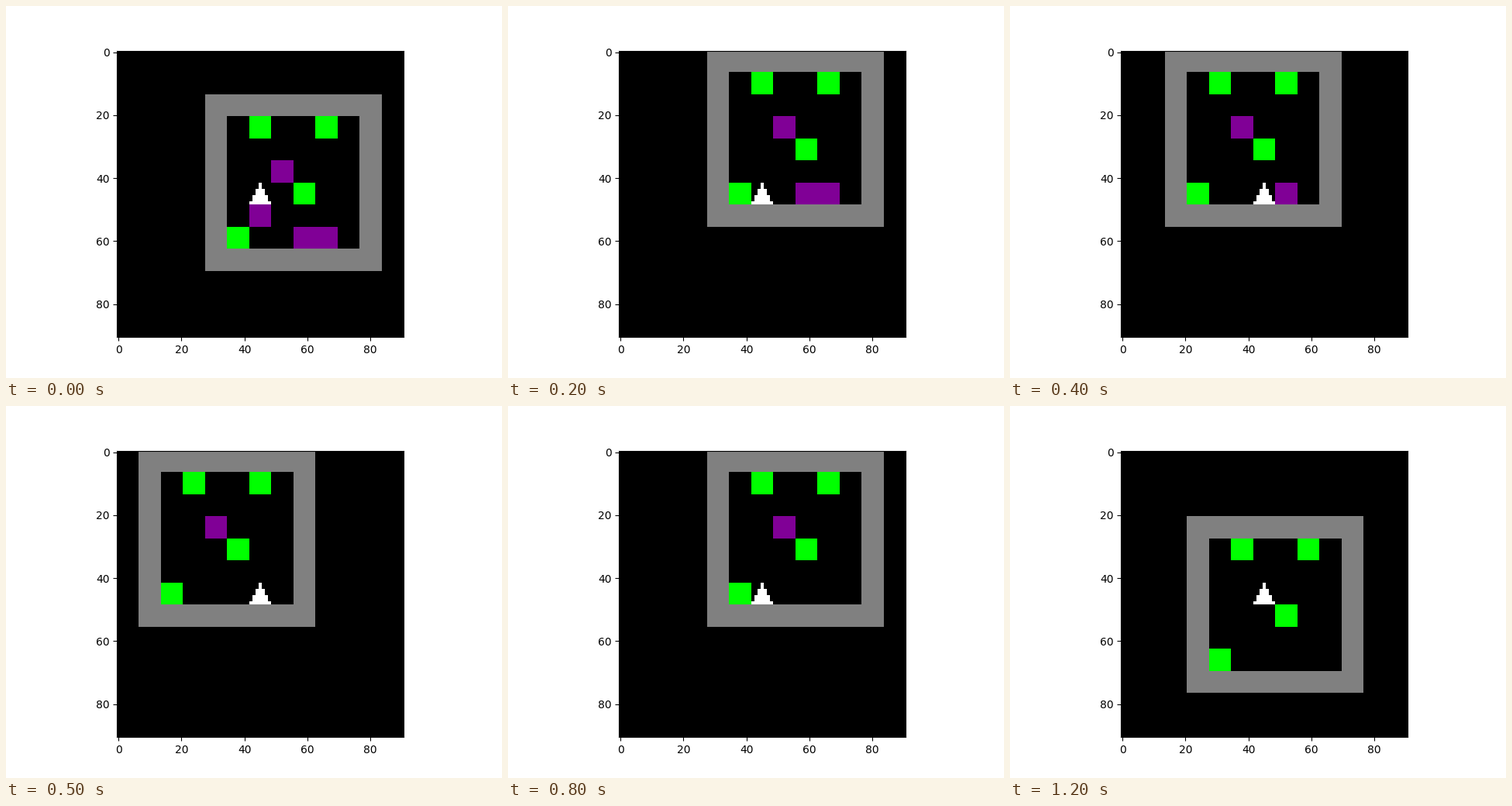
Recreate the animation shown at these times as a matplotlib script. Size 640 px wide and 480 px high, loop 1.3 s.

```python
import numpy as np
import matplotlib.pyplot as plt
from matplotlib.animation import FuncAnimation

CELL, VIEW, SIZE = 7, 13, 8   # pixels per cell, cells in view, room side
HALF = VIEW // 2

BLACK, GREY = (0, 0, 0), (128, 128, 128)
GREEN, PURPLE, WHITE = (0, 255, 0), (128, 0, 150), (255, 255, 255)

GREENS = [(2, 1), (5, 1), (4, 4), (1, 6)]
PURPLES = [(3, 3), (2, 5), (4, 6), (5, 6)]
START = (2, 4)
MOVES = "DDRRRLLLUUUR"
STEP = {"U": (0, -1), "D": (0, 1), "L": (-1, 0), "R": (1, 0)}

PATH = np.cumsum([START] + [STEP[m] for m in MOVES], axis=0)


def room(visited):
    """Grid of cell colours, padded so the view never leaves it."""
    grid = np.zeros((SIZE + 2 * HALF, SIZE + 2 * HALF, 3), np.uint8)
    inner = grid[HALF:-HALF, HALF:-HALF]
    inner[:] = GREY
    inner[1:-1, 1:-1] = BLACK
    for x, y in GREENS:
        inner[y, x] = GREEN
    for x, y in PURPLES:
        if (x, y) not in visited:
            inner[y, x] = PURPLE
    return grid


def draw_agent(img):
    mid = HALF * CELL + CELL // 2
    for row in range(CELL):
        w = row // 2
        img[HALF * CELL + row, mid - w:mid + w + 1] = WHITE


def view(i):
    """The room as seen with the agent in the middle."""
    x, y = PATH[i]
    visited = {(int(a), int(b)) for a, b in PATH[:i + 1]}
    cells = room(visited)[y:y + VIEW, x:x + VIEW]
    img = cells.repeat(CELL, axis=0).repeat(CELL, axis=1)
    draw_agent(img)
    return img


fig, ax = plt.subplots(figsize=(6.4, 4.8), dpi=100)
picture = ax.imshow(view(0), interpolation="nearest")


def update(i):
    picture.set_data(view(i))
    return [picture]


anim = FuncAnimation(fig, update, frames=len(PATH), interval=100,
                     repeat=True, repeat_delay=0)
plt.show()
```
